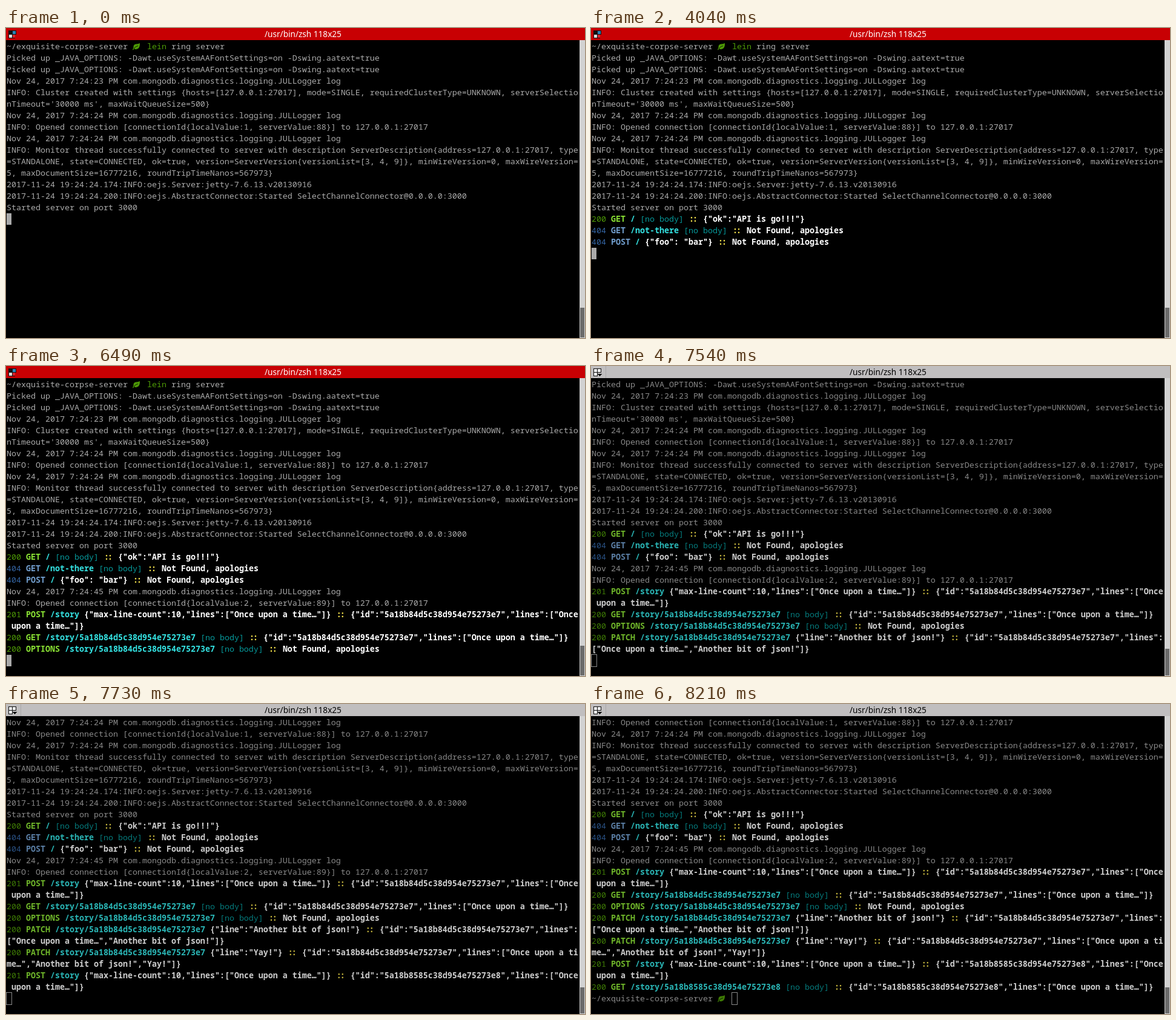
An HTML page that plays this animation: 956 by 512 pixels, repeating every 8260 ms.

```html
<!DOCTYPE html>
<html lang="en">
<head>
<meta charset="utf-8">
<title>Terminal</title>
<style>
@property --n { syntax: "<number>"; inherits: true; initial-value: 15; }
html, body { margin: 0; width: 100%; height: 100%; overflow: hidden; background: #000; }
#stage { position: relative; width: 956px; height: 512px; overflow: hidden; background: #000; }
#stage, #stage * { animation-duration: 8260ms; animation-timing-function: step-end; animation-iteration-count: infinite; }

#bar { position: absolute; inset: 0 0 auto; height: 20px; background: #c80003; color: #fff; animation-name: bar;
  font: 13.6px/20px "Noto Sans", "Open Sans", sans-serif; }
#bar span { position: absolute; left: 427px; white-space: pre; }
#bar svg { position: absolute; left: 0; top: 0; }
#on { animation-name: hide; }
#off { visibility: hidden; animation-name: show; }

#term { position: absolute; left: 0; top: 21px; width: 947px; height: 491px; overflow: hidden; color: #aaa;
  font: 13.3333px/19px "Noto Sans Mono", "DejaVu Sans Mono", monospace; font-variant-ligatures: none;
  animation-name: rows, dim; }
#log, #prompt { margin: 0; padding-left: 1px; font: inherit; white-space: pre; overflow: hidden; }
#log { height: calc(var(--n) * 19px); margin-top: min(0px, calc((24 - var(--n)) * 19px)); }
#last { height: 19px; display: flex; }
#prompt { width: 0; animation-name: prompt; }
#cursor { width: 8px; height: 19px; background: #aaa; animation-name: cursor; }
.leaf { display: inline-block; width: 16px; height: 13px; vertical-align: -2px; }

b { font-weight: 700; color: #fff; }
.green { color: #4e9a06; } b.green { color: #8ae234; }
.blue { color: #3465a4; } b.blue { color: #729fcf; }
.cyan { color: #06989a; } b.cyan { color: #34e2e2; }
b.sep { color: #fce94f; letter-spacing: -2px; padding: 0 3px 0 1px; }

#track { position: absolute; left: 947px; top: 20px; width: 9px; height: 492px; background: #d2d2d2; }
#thumb { position: absolute; left: 1px; top: 442px; width: 7px; bottom: 1px; background: #6b6b6b; animation-name: thumb; }

@keyframes rows {
  0% { --n: 15 } .2421% { --n: 16 } .6053% { --n: 17 }
  48.9104% { --n: 18 } 49.1525% { --n: 20 } 67.1912% { --n: 22 }
  78.3292% { --n: 23 } 78.5714% { --n: 24 } 91.2832% { --n: 26 }
  93.3414% { --n: 28 } 93.5835% { --n: 30 } 97.5786%, 100% { --n: 31 }
}
@keyframes dim { 0% { filter: none } 91.2832%, 100% { filter: brightness(.8) } }
@keyframes bar { 0% { background: #c80003; color: #fff } 91.2832%, 100% { background: #c0bebf; color: #000 } }
@keyframes hide { 0% { visibility: visible } 91.2832%, 100% { visibility: hidden } }
@keyframes show { 0% { visibility: hidden } 91.2832%, 100% { visibility: visible } }
@keyframes cursor {
  0% { background: #aaa; box-shadow: none }
  91.2832%, 100% { background: #000; box-shadow: 0 0 0 1px #aaa }
}
@keyframes prompt { 0% { width: 0 } 98.7893%, 100% { width: 232px } }
@keyframes thumb { 0% { top: 442px } 91.2832% { top: 447px } 93.5835%, 100% { top: 448px } }
</style>
</head>
<body>
<div id="stage">
  <div id="term">
    <pre id="log"></pre>
    <div id="last"><pre id="prompt"></pre><div id="cursor"></div></div>
  </div>
  <div id="track"><div id="thumb"></div></div>
  <div id="bar">
    <svg width="26" height="20" shape-rendering="crispEdges">
      <g id="on">
        <path fill="#111" d="M4 4h13v7h-2v6H4z"/>
        <path fill="#2b83b5" d="M11 5h5v5h-5z"/>
        <path fill="#ddd" d="M5 11h5v5H5z"/>
        <path fill="#d8232a" d="M11 11h4v5h-4z"/>
      </g>
      <g id="off">
        <path fill="#eee" stroke="#111" d="M4.5 4.5h12v6h-6v6h-6zM10.5 4.5v6M4.5 10.5h6"/>
        <path fill="#111" d="M11 13h7l-3.5 4z"/>
        <path fill="#a9a7a8" d="M24 0h1v20h-1z"/>
      </g>
    </svg>
    <span>/usr/bin/zsh 118x25</span>
  </div>
</div>
<script>
const tag = (name, cls, text) => `<${name} class="${cls}">${text}</${name}>`;
const leaf = '<svg class="leaf" viewBox="0 0 16 13"><path fill="#4e9a06" d="M0 12Q1 10 1.500 8Q1 3 6 2.500Q9 2.500 12 1Q12.500 10 6.500 11Q4 11.500 2.500 10L1 12.500z"/><path stroke="#000" stroke-width=".8" fill="none" d="M2 10Q5 6 9 5.500"/></svg>';
const prompt = `~/exquisite-corpse-server ${leaf} `;
const none = tag("span", "cyan", "[no body]");
const lost = "Not Found, apologies";
const stamp = (s) => `Nov 24, 2017 7:24:${s} PM com.mongodb.diagnostics.logging.JULLogger log`;
const opened = (a, b) => `INFO: Opened connection [connectionId{localValue:${a}, serverValue:${b}}] to 127.0.0.1:27017`;

function request(status, verb, path, body, reply) {
  const tone = status === 404 ? "blue" : "green";
  return [
    tag("span", tone, status), tag("b", tone, verb), tag("b", "cyan", path),
    body ? tag("b", "", body) : none, tag("b", "sep", "::"), tag("b", "", reply),
  ].join(" ");
}

const id1 = "5a18b84d5c38d954e75273e7", id2 = "5a18b8585c38d954e75273e8";
const once = '"Once upon a time…"';
const bit = '"Another bit of json!"';
const draft = `{"max-line-count":10,"lines":[${once}]}`;
const story = (id, lines) => `{"id":"${id}","lines":${lines}}`;
const created = (id) => request(201, "POST", "/story", draft, story(id, '["Once\n upon a time…"]'));
const fetched = (id) => request(200, "GET", "/story/" + id, "", story(id, `[${once}]`));
const patched = (line, lines) => request(200, "PATCH", "/story/" + id1, `{"line":${line}}`, story(id1, lines));
const picked = "Picked up _JAVA_OPTIONS: -Dawt.useSystemAAFontSettings=on -Dswing.aatext=true";

const log = [
  prompt + tag("span", "green", "lein") + " ring server",
  picked,
  picked,
  stamp(23),
  "INFO: Cluster created with settings {hosts=[127.0.0.1:27017], mode=SINGLE, requiredClusterType=UNKNOWN, serverSelectio\nnTimeout='30000 ms', maxWaitQueueSize=500}",
  stamp(24),
  opened(1, 88),
  stamp(24),
  "INFO: Monitor thread successfully connected to server with description ServerDescription{address=127.0.0.1:27017, type\n=STANDALONE, state=CONNECTED, ok=true, version=ServerVersion{versionList=[3, 4, 9]}, minWireVersion=0, maxWireVersion=\n5, maxDocumentSize=16777216, roundTripTimeNanos=567973}",
  "2017-11-24 19:24:24.174:INFO:oejs.Server:jetty-7.6.13.v20130916",
  "2017-11-24 19:24:24.200:INFO:oejs.AbstractConnector:Started SelectChannelConnector@0.0.0.0:3000",
  "Started server on port 3000",
  request(200, "GET", "/", "", '{"ok":"API is go!!!"}'),
  request(404, "GET", "/not-there", "", lost),
  request(404, "POST", "/", '{"foo": "bar"}', lost),
  stamp(45),
  opened(2, 89),
  created(id1),
  fetched(id1),
  request(200, "OPTIONS", "/story/" + id1, "", lost),
  patched(bit, `\n[${once},${bit}]`),
  patched('"Yay!"', `["Once upon a ti\nme…",${bit},"Yay!"]`),
  created(id2),
  fetched(id2),
];

document.getElementById("log").innerHTML = log.join("\n");
document.getElementById("prompt").innerHTML = prompt;
</script>
</body>
</html>
```
